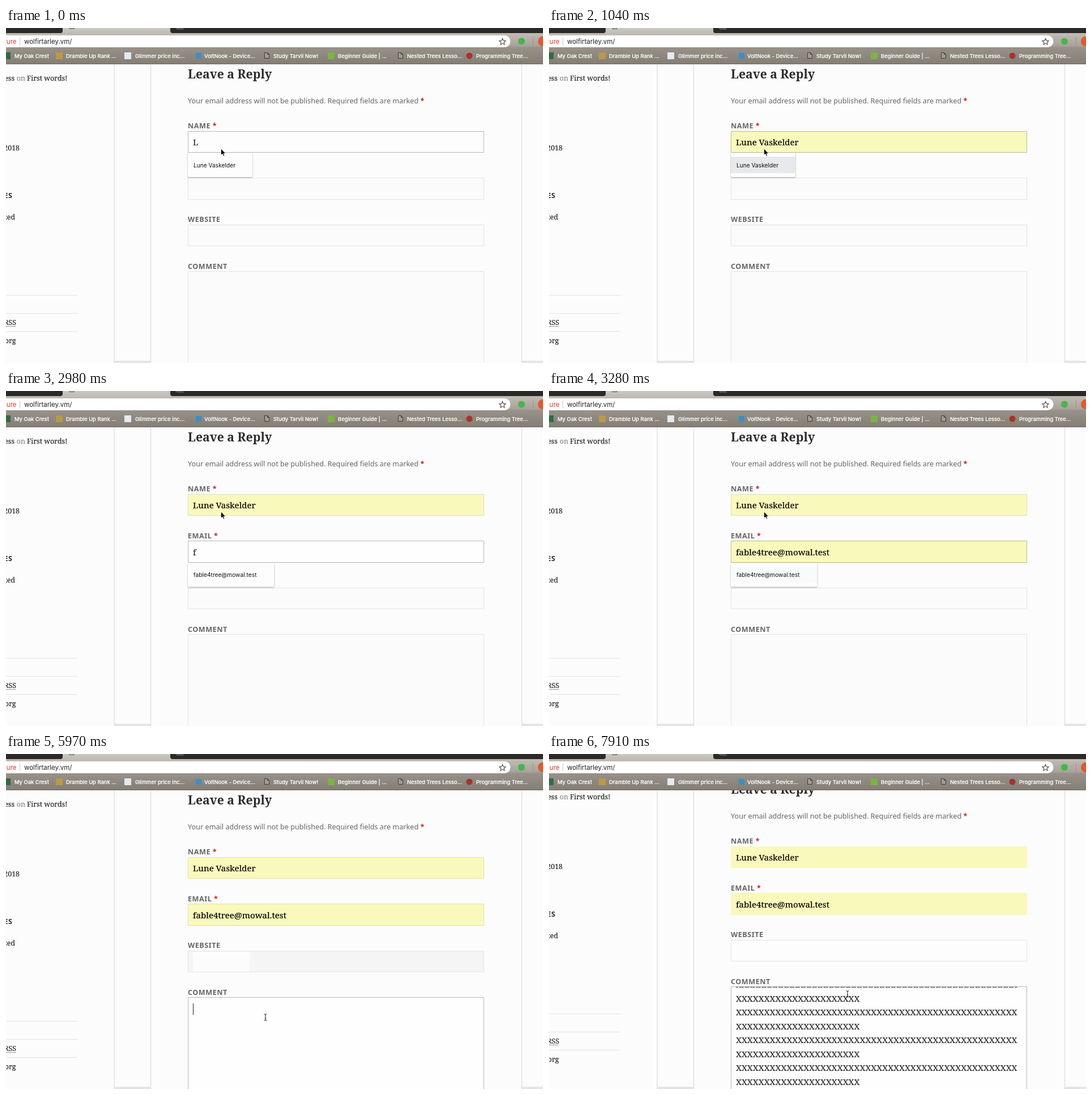
An HTML page for the animation above (8 s loop, 948 by 591 pixels).

```html
<!DOCTYPE html>
<html lang="en">
<head>
<meta charset="utf-8">
<title>Comment form</title>
<style>
html, body { margin: 0; width: 100%; height: 100%; overflow: hidden; background: #fcfcfc; }
svg { display: block; width: 948px; height: 591px; }
text { white-space: pre; }
.serif { font-family: "Noto Serif", serif; }
.sans { font-family: "Noto Sans", sans-serif; }
.ui { font-family: Inter, Roboto, sans-serif; }
.value { font-size: 15.06px; fill: #000; stroke: #000; stroke-width: .2px; }
.typed { fill: #2b2b2b; stroke: #2b2b2b; }
.label { font-size: 12.65px; font-weight: 700; letter-spacing: .04em; fill: #666; }
.req { fill: #c0271d; }
.side { font-size: 12.4px; fill: #222; text-anchor: end; stroke: #222; stroke-width: .15px; }
.soft { fill: #777; stroke: none; }
.mark { font-size: 9.4px; font-weight: 500; fill: #fff; stroke: #fff; stroke-width: .2px; }
.item { font-size: 10.2px; fill: #111; }
.field { fill: #fbfbfb; stroke: #e4e4e4; }
.menu { filter: drop-shadow(0 1px 1px rgba(0, 0, 0, .35)); }

/* every state change is a hard cut on one 8 s clock */
.t { animation: 8s step-end infinite; }
#caret { animation-name: caret; }
#arrow { animation-name: arrow; }
#beam { animation-name: beam; }
#main { animation-name: scrollMain; }
#aside { animation-name: scrollSide; }
#name { animation-name: name; }
#mail { animation-name: mail; }
#site { animation-name: site; }
#note { animation-name: note; }
#sheen { animation-name: sheen; }
#nameKey { animation-name: nameKey; }
#nameFull, #namePick { animation-name: nameFull; }
#nameMenu { animation-name: nameMenu; }
#mailKey { animation-name: mailKey; }
#mailFull, #mailPick { animation-name: mailFull; }
#mailMenu { animation-name: mailMenu; }
#lines { animation-name: lines; }

@keyframes caret {
  0% { opacity: 0; transform: translate(339px, 191px); }
  5.625% { opacity: 1; }
  11.125% { opacity: 0; }
  14.875% { opacity: 1; transform: translate(330px, 273px); }
  22.375% { opacity: 0; }
  28% { opacity: 1; }
  31.625% { transform: translate(335px, 273px); }
  37.25% { opacity: 0; }
  44.625% { opacity: 1; transform: translate(330px, 356px); }
  50.25% { transform: translate(330px, 440px); }
  55.875% { opacity: 0; }
  63.375% { opacity: 1; }
  69% { opacity: 0; }
  74.625% { opacity: 1; }
  93.375%, 100% { opacity: 0; }
}
@keyframes arrow {
  0% { opacity: 1; transform: translate(379px, 212px); }
  55.875% { transform: translate(430px, 315px); }
  57.75% { transform: translate(468px, 402px); }
  59.625%, 100% { opacity: 0; }
}
@keyframes beam {
  0% { opacity: 0; transform: translate(455px, 447px); }
  59.625% { opacity: 1; }
  61.5% { transform: translate(455px, 458px); }
  98.875%, 100% { opacity: 1; transform: translate(524px, 417px); }
}
@keyframes scrollMain {
  0% { transform: none; }
  93.375%, 100% { transform: translateY(-19px); }
}
@keyframes scrollSide {
  0% { transform: none; }
  93.375%, 100% { transform: translateY(-13px); }
}
@keyframes name {
  0% { fill: #fdfdfd; stroke: #b9b9b9; }
  13% { fill: #f9f9bb; stroke: #b9b992; }
  14.875% { stroke: #e2e1aa; }
  93.375%, 100% { fill: #f9f9bb; stroke: #f9f9bb; }
}
@keyframes mail {
  0% { fill: #fbfbfb; stroke: #e4e4e4; }
  14.875% { fill: #fefefe; stroke: #b9b9b9; }
  41% { fill: #f9f9bb; stroke: #b9b992; }
  44.625% { stroke: #e2e1aa; }
  93.375%, 100% { fill: #f9f9bb; stroke: #f9f9bb; }
}
@keyframes site {
  0% { fill: #fbfbfb; stroke: #e4e4e4; }
  44.625% { fill: #fefefe; stroke: #b9b9b9; }
  50.25% { fill: #f5f5f5; stroke: #e4e4e4; }
  93.375%, 100% { fill: #fdfdfd; stroke: #e4e4e4; }
}
@keyframes note {
  0% { fill: #fbfbfb; stroke: #e4e4e4; }
  50.25%, 100% { fill: #fefefe; stroke: #b9b9b9; }
}
@keyframes sheen {
  0% { opacity: 0; transform: none; }
  55.875% { opacity: 1; }
  57.75% { transform: scaleX(.9); }
  93.375%, 100% { opacity: 0; }
}
@keyframes nameKey { 0% { opacity: 1; } 13%, 100% { opacity: 0; } }
@keyframes nameFull { 0% { opacity: 0; } 13%, 100% { opacity: 1; } }
@keyframes nameMenu { 0% { opacity: 1; } 14.875%, 100% { opacity: 0; } }
@keyframes mailKey { 0% { opacity: 0; } 31.625% { opacity: 1; } 41%, 100% { opacity: 0; } }
@keyframes mailFull { 0% { opacity: 0; } 41%, 100% { opacity: 1; } }
@keyframes mailMenu { 0% { opacity: 0; } 31.625% { opacity: 1; } 44.625%, 100% { opacity: 0; } }
@keyframes lines { 0% { opacity: 0; } 93.375%, 100% { opacity: 1; } }
</style>
</head>
<body>
<svg viewBox="0 0 948 591">
  <defs>
    <linearGradient id="bar" x1="0" y1="0" x2="0" y2="1">
      <stop offset="0" stop-color="#cbc7c1"/>
      <stop offset=".5" stop-color="#a8a299"/>
      <stop offset=".55" stop-color="#989189"/>
      <stop offset="1" stop-color="#847e75"/>
    </linearGradient>
    <clipPath id="inside"><rect x="321" y="430" width="523" height="190"/></clipPath>
    <path id="page" d="M.5 .5h5l3 3v7h-8zM5.5 .5v3h3" fill="#a19b93" stroke="#3f3c38"/>
  </defs>

  <rect width="948" height="591" fill="#fcfcfc"/>
  <path d="M191 587h64v4h-64zM911 587h37v4h-37z" fill="#e5e5e5"/>
  <path d="M191 63v528M255.5 63v528M910.5 63v528" stroke="#e0e0e0" stroke-width="1.4"/>

  <g id="aside" class="t">
    <g class="serif side">
      <text x="15" y="93">ess</text>
      <text class="soft" x="34" y="93">on</text>
      <text x="37" y="93" style="text-anchor:start">First words!</text>
      <text x="24" y="216">2018</text>
      <text x="16" y="338">ized</text>
      <text x="18" y="524">RSS</text>
      <text x="17.5" y="556">org</text>
    </g>
    <text class="sans label" x="11.5" y="300" text-anchor="end" style="fill:#2d2d2d">ES</text>
    <path d="M0 526.5h18" stroke="#333" stroke-dasharray="1 1"/>
    <path d="M0 471.5h126M0 503.5h126M0 535.5h126" stroke="#e4e4e4"/>
  </g>

  <g id="main" class="t">
    <text class="serif" x="321" y="89" font-size="21.25" font-weight="700" fill="#2b2b2b">Leave a Reply</text>
    <text class="sans" x="321" y="133" font-size="12.66" fill="#666">Your email address will not be published. Required fields are marked <tspan class="req" font-weight="700">*</tspan></text>

    <g class="sans label">
      <text x="321" y="177">NAME <tspan class="req">*</tspan></text>
      <text x="321" y="259.5">EMAIL <tspan class="req">*</tspan></text>
      <text x="321" y="342">WEBSITE</text>
      <text x="321" y="424.5">COMMENT</text>
    </g>

    <rect id="name" class="field t" x="321.5" y="182.5" width="522" height="37"/>
    <rect id="mail" class="field t" x="321.5" y="264.5" width="522" height="38"/>
    <rect id="site" class="field t" x="321.5" y="347.5" width="522" height="37"/>
    <rect id="note" class="field t" x="321.5" y="429.5" width="522" height="220"/>
    <g transform="translate(330 349)"><rect id="sheen" class="t" width="111" height="35" fill="#fcfcfc"/></g>

    <g class="serif value">
      <text id="nameKey" class="t typed" x="330" y="207">L</text>
      <text id="nameFull" class="t" x="330" y="207">Lune Vaskelder</text>
      <text id="mailKey" class="t typed" x="330" y="289.5">f</text>
      <text id="mailFull" class="t" x="330" y="289.5">fable4tree@mowal.test</text>
    </g>
    <g clip-path="url(#inside)"><g id="lines" class="serif value typed t"></g></g>
  </g>

  <g id="nameMenu" class="ui item t">
    <path class="menu" d="M321 220h114v41a2 2 0 0 1-2 2h-110a2 2 0 0 1-2-2z" fill="#fdfdfd"/>
    <rect id="namePick" class="t" x="321" y="227" width="114" height="29" fill="#e7e9ec"/>
    <text x="331" y="245.5">Lune Vaskelder</text>
  </g>
  <g id="mailMenu" class="ui item t">
    <path class="menu" d="M321 303h152.500v40.500a2 2 0 0 1-2 2h-148.500a2 2 0 0 1-2-2z" fill="#fdfdfd"/>
    <rect id="mailPick" class="t" x="321" y="310" width="152" height="28" fill="#f9fafc"/>
    <text x="331" y="328">fable4tree@mowal.test</text>
  </g>

  <rect id="caret" class="t" width="1" height="20.500" fill="#222"/>

  <g id="chrome">
    <rect width="948" height="63" fill="url(#bar)"/>
    <path d="M0 0h100v5q0 4-4 4H0zM290 0h658v9H294q-4 0-4-4z" fill="#2c2926"/>
    <path d="M299 0h13l3 3h-13z" fill="#5b5753"/>
    <path d="M112 0v1.500h8V0" fill="none" stroke="#5a5651"/>
    <path d="M0 63.500h948" stroke="#6c675f"/>
    <path d="M0 13h880a10.500 10.500 0 0 1 0 21H0z" fill="#fff"/>
    <g class="ui" font-size="11.5">
      <text x="18.500" y="28" text-anchor="end" fill="#d0392b">Secure</text>
      <path d="M24.500 17v13" stroke="#c4c4c4"/>
      <text x="32" y="28" fill="#222">wolfirtarley.vm/</text>
    </g>
    <path d="M876.500 18.500l1.600 3.700 4 .4-3 2.700.9 3.900-3.500-2.100-3.500 2.100.9-3.900-3-2.700 4-.4z" fill="none" stroke="#555" stroke-width="1.200"/>
    <circle cx="910" cy="23.500" r="6" fill="#45b649"/>
    <path d="M930.500 16v15" stroke="#9a948b"/>
    <circle cx="948" cy="23.500" r="9" fill="#e8562a"/>

    <rect y="43" width="8" height="12" fill="#2f6b45"/>
    <rect x="88" y="43" width="12" height="12" fill="#b99a45"/>
    <rect x="209" y="43" width="12" height="12" fill="#e4ebf1"/>
    <rect x="335" y="44" width="10" height="10" fill="#3b8fc6"/>
    <rect x="568" y="43" width="12" height="12" fill="#7db343"/>
    <circle cx="818" cy="49" r="5.500" fill="#a8322b"/>
    <use href="#page" x="456" y="43"/>
    <use href="#page" x="692" y="43"/>
    <g class="ui mark">
      <text x="15" y="52.500">My Oak Crest</text>
      <text x="106" y="52.500">Dramble Up Rank ...</text>
      <text x="228" y="52.500">Glimmer price inc...</text>
      <text x="350" y="52.500">VoltNook - Device...</text>
      <text x="472" y="52.500">Study Tarvil Now!</text>
      <text x="586" y="52.500">Beginner Guide | ...</text>
      <text x="708" y="52.500">Nested Trees Lesso...</text>
      <text x="830" y="52.500">Programming Tree...</text>
    </g>
  </g>

  <path id="arrow" class="t" d="M.5 .8v11.700l2.600-2.400 1.700 4 1.900-.8-1.700-3.900h3.700z" fill="#000" stroke="#fff" stroke-width=".8"/>
  <path id="beam" class="t" d="M.5 .7q2.500 0 2.500 1.800q0-1.800 2.500-1.800M3 2v9M.5 12.300q2.500 0 2.500-1.800q0 1.800 2.500 1.800M1.800 8h2.400" fill="none" stroke="#222"/>
</svg>
<script>
// Wrapped comment text: full rows alternate with short ones.
const lines = document.getElementById("lines");
for (let i = 0; i < 8; i++) {
  const row = document.createElementNS("http://www.w3.org/2000/svg", "text");
  row.setAttribute("x", 330);
  row.setAttribute("y", 431 + i * 24.5);
  row.textContent = "X".repeat(i % 2 ? 22 : 50);
  lines.append(row);
}
</script>
</body>
</html>
```
